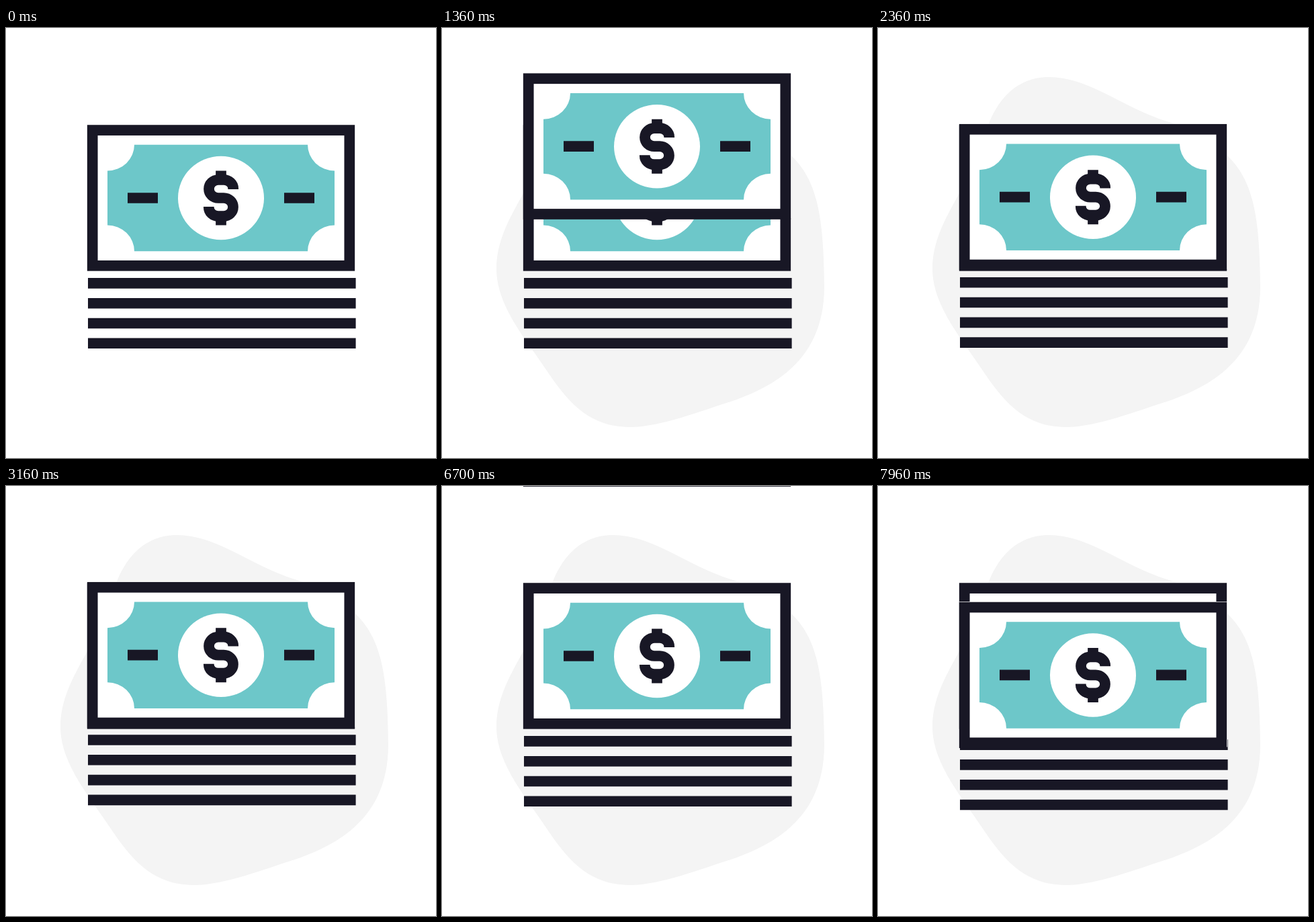
Write an HTML page that moves like this. It is 640 px wide and 640 px high and loops after 8 s.

```html
<!DOCTYPE html>
<html lang="en">
<head>
<meta charset="utf-8">
<title>Stack of cash</title>
<style>
  html, body { margin: 0; width: 100%; height: 100%; overflow: hidden; background: #fff; }
  svg { display: block; width: 100vw; height: 100vh; }
</style>
</head>
<body>
<svg viewBox="0 0 640 640">
  <defs>
    <g id="bill">
      <path fill="#fff" d="M121 143.6H520V360H121Z"/>
      <rect x="128.7" y="152.1" width="382.6" height="201.7" fill="#fff" stroke="#181725" stroke-width="15.7"/>
      <path fill="#6dc7c9" d="M191 173.8H449A40 38.7 0 0 0 489 212.5V293.5A40 38.7 0 0 0 449 332.2H191A40 38.7 0 0 0 151 293.5V212.5A40 38.7 0 0 0 191 173.8Z"/>
      <ellipse cx="320" cy="253" rx="64" ry="62.2" fill="#fff"/>
      <g fill="none" stroke="#181725" stroke-width="15.7">
        <path d="M181 253H226M414 253H459M320 212.6V224M320 282V293.6"/>
        <path d="M338.2 239.9V239A14 13 0 0 0 324 226H316A14 13.5 0 0 0 316 253H324A14 13.5 0 0 1 324 280H316A14 13 0 0 1 301.8 267V266.1"/>
      </g>
    </g>
  </defs>
  <path id="blob" fill="#f4f4f4" d="M250 73C312 71 361 117 430 139C473 152 500 166 520 190C560 228 568 285 569 385C569 490 500 532 430 556C388 569 325 594 280 594C200 594 172 530 133 477C108 441 81 402 81 358C81 315 103 279 121 246C148 195 150 178 165 142C182 100 210 75 250 73Z"/>
  <path id="bars" stroke="#181725" stroke-width="15.6" d="M122 379.9H520.6M122 409.7H520.6M122 439.5H520.6M122 469.3H520.6"/>
  <use href="#bill"/>
  <use id="flyer" href="#bill"/>
</svg>
<script>
const LOOP = 8000, START = 500, STEP = 40, CYCLE = 155;
const LAND = 26, GONE = 104, REST = -1.3;
const [blob, bars, flyer] = ['blob', 'bars', 'flyer'].map(id => document.getElementById(id));

// Falls with gathering speed, then rings around the resting place.
function billY(n) {
  const speed = 370;
  if (n < LAND) {
    const s = n / LAND, r = 1 - s;
    return REST - 359.5 * r * r * (1 + 2 * s) + 190 * s * r * r - speed * s * s * r;
  }
  const k = n - LAND, w = Math.PI / 10;
  return REST + speed / LAND / w * Math.sin(w * k) * Math.exp(-0.084 * k);
}

// The stack is pushed down, returns, and trembles for a while.
function barsY(n) {
  const peak = 36, back = 45.3, depth = 10.4;
  if (n < LAND || n >= 92) return 0;
  if (n < peak) return depth * (n - LAND) / (peak - LAND);
  if (n < back) return depth * (back - n) / (back - peak);
  const k = n - back;
  return -2.6 * Math.exp(-0.01 * k) * Math.sin(2 * Math.PI * k / 9.5);
}

function move(el, y) {
  el.setAttribute('transform', `translate(0 ${y.toFixed(2)})`);
}

function draw(now) {
  const t = now % LOOP;
  const started = t >= START;
  const n = started ? Math.floor((t - START) / STEP) % CYCLE : CYCLE;
  blob.style.visibility = started ? 'visible' : 'hidden';
  flyer.style.opacity = n >= GONE ? 0 : n === GONE - 1 ? 0.5 : 1;
  move(flyer, billY(n));
  move(bars, barsY(n));
}

const t0 = performance.now();
function tick() {
  draw(performance.now() - t0);
  requestAnimationFrame(tick);
}
tick();
</script>
</body>
</html>
```
